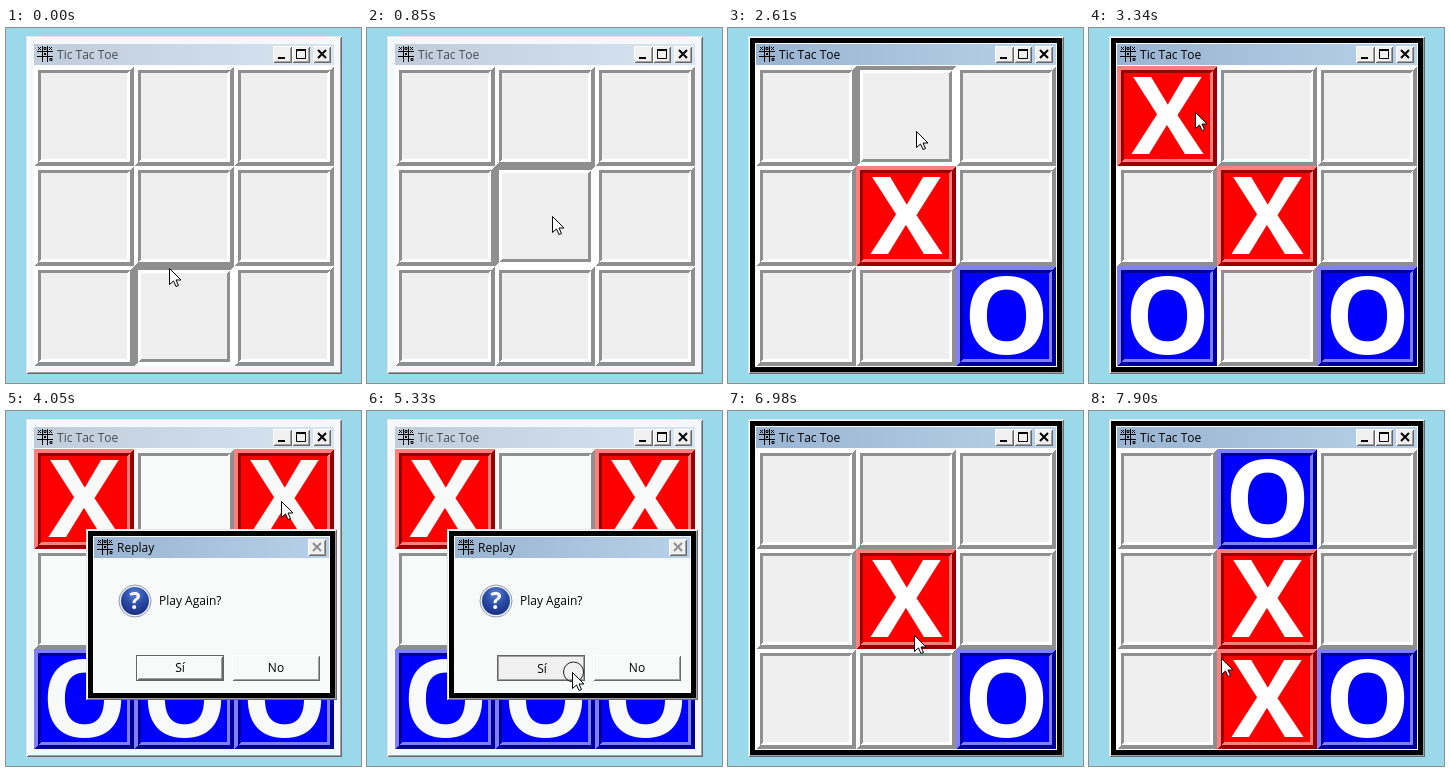
An HTML page for the animation above (8000 ms loop, 355 px wide and 355 px high).

```html
<!DOCTYPE html>
<html lang="en">
<head>
<meta charset="utf-8">
<title>Tic Tac Toe</title>
<style>
html, body { margin: 0; width: 100%; height: 100%; overflow: hidden; background: #9ad9ea }
svg { display: block; width: 100%; height: 100%; font: 12px "Open Sans", sans-serif; font-kerning: none }
.mark { font-size: 108px; font-weight: 700; text-anchor: middle }
.mid { text-anchor: middle }
.help { font-size: 23px; font-weight: 700; text-anchor: middle }
.crisp { shape-rendering: crispEdges }
</style>
</head>
<body>
<svg id="stage" viewBox="0 0 355 355"></svg>
<script>
const LOOP = 8000, STEP = 135;
const ACTIVATE = 1560, DIALOG_OPEN = 4050, DIALOG_PRESS = 5330, DIALOG_CLOSE = 5470;
const stage = document.getElementById('stage');

// The pointer glides to each point in even steps, optionally bending towards a control point
const glides = [
  { start: 0, end: 0, to: [163, 240] },
  { start: 280, end: 280, to: [163, 238] },
  { start: 580, end: 850, to: [185, 188] },
  { start: 2100, end: 2775, to: [77, 64], bend: [300, 120] },
  { start: 3340, end: 3340, to: [106, 84] },
  { start: 3475, end: 3610, to: [275, 90] },
  { start: 4450, end: DIALOG_PRESS, to: [205, 261], bend: [265, 165] },
  { start: 5880, end: 6280, to: [194, 207] },
  { start: 6860, end: 7295, to: [161, 276] },
  { start: 7900, end: 7900, to: [132, 247] }
];
const moves = [
  { press: ACTIVATE, release: 1820, x: 4, o: 8 },
  { press: 2775, release: 2910, x: 0, o: 6 },
  { press: 3890, release: DIALOG_OPEN, x: 2, o: 7 },
  { press: 6280, release: 6550, x: 4, o: 8 },
  { press: 7295, release: 7440, x: 7, o: 1 }
];

function pointerAt(t) {
  const i = glides.findLastIndex(g => g.start <= t);
  const { start, end, to, bend } = glides[i];
  const from = glides[Math.max(0, i - 1)].to;
  const steps = Math.round((end - start) / STEP) + 1;
  const p = t >= end ? 1 : (Math.floor((t - start) / STEP) + 1) / steps;
  return from.map((a, k) => {
    const c = bend ? bend[k] : (a + to[k]) / 2;
    return Math.round(a * (1 - p) ** 2 + 2 * c * p * (1 - p) + to[k] * p * p);
  });
}

const rect = (x, y, w, h, fill) => `<rect class="crisp" x="${x}" y="${y}" width="${w}" height="${h}" fill="${fill}"/>`;
const disc = (x, y, r, fill, stroke) => `<circle cx="${x}" cy="${y}" r="${r}" fill="${fill}" stroke="${stroke}"/>`;
const path = (d, stroke, width = 1, fill = 'none') =>
  `<path d="${d}" stroke="${stroke}" stroke-width="${width}" fill="${fill}"/>`;
const text = (x, y, s, fill = '#000', cls = '') => `<text x="${x}" y="${y}" fill="${fill}" class="${cls}">${s}</text>`;
const at = (x, y, content) => `<g transform="translate(${x} ${y})">${content}</g>`;

// Mitred border; the half pixel gives the diagonal to the top/left colour
const bevel = (x, y, w, h, b, topLeft, bottomRight) => rect(x, y, w, h, bottomRight) +
  `<path class="crisp" fill="${topLeft}" d="M${x} ${y}h${w + .5}l${-b} ${b}H${x + b}V${y + h - b + .5}l${-b} ${b}z"/>`;

const raised = (x, y, w, h, face = '#f0f0f0') =>
  bevel(x, y, w, h, 1, '#fff', '#696969') +
  bevel(x + 1, y + 1, w - 2, h - 2, 1, face, '#a0a0a0') +
  rect(x + 2, y + 2, w - 4, h - 4, face);

function cell(i, mark, state, white, face) {
  const x = 28 + i % 3 * 100, y = 38 + Math.floor(i / 3) * 100;
  let light = white, dark = '#8f8f8f';
  if (mark === 'X') [face, light, dark] = ['#f00', '#ff7f7f', '#900'];
  if (mark === 'O') [face, light, dark] = ['#00f', '#7f7fff', '#009'];
  const [a, b, c, d] = {
    ridge: [light, dark, dark, light],
    groove: [dark, light, light, dark],
    sunken: [dark, light, '#000', face]
  }[state];
  return bevel(x, y, 100, 100, 4, a, b) + bevel(x + 4, y + 4, 92, 92, 3, c, d) +
    rect(x + 7, y + 7, 86, 86, face) +
    (mark ? text(x + 50.5, y + 88, mark, white, 'mark') : '');
}

const cross = (x, y, s) => `M${x} ${y}l${s} ${s}m0 ${-s}l${-s} ${s}`;
const icon = (x, y) => at(x, y,
  path('M5.5 0v16M10.5 0v16M0 5.5h16M0 10.5h16', '#000') +
  path(cross(1, 1, 3) + cross(12, 1, 3) + cross(7, 7, 2) + 'M7 1.5h2v2h-2zM13 12.5h2v2h-2z', '#000'));

const closeButton = (x, y, ink) => raised(x, y, 18, 17) + path(cross(x + 5, y + 4, 8), ink, 2);

function frame(x, y, w, h, active, title) {
  return bevel(x, y, w, h, 1, '#e3e3e3', '#696969') +
    bevel(x + 1, y + 1, w - 2, h - 2, 1, '#fff', '#a0a0a0') +
    rect(x + 2, y + 2, w - 4, h - 4, active ? '#000' : '#f4f7fc') +
    rect(x + 7, y + 7, w - 14, h - 14, '#f8f9f9') +
    rect(x + 8, y + 8, w - 16, 21, `url(#${active ? 'active' : 'inactive'})`) +
    icon(x + 11, y + 10) + text(x + 31, y + 23, title, active ? '#000' : '#434e54');
}

function pushButton(x, label, isDefault, pressed) {
  const y = 244, w = 88, h = 26, shift = pressed ? 1 : 0;
  const body = pressed ? bevel(x + 1, y + 1, w - 2, h - 2, 1, '#a0a0a0', '#a0a0a0') + rect(x + 2, y + 2, w - 4, h - 4, '#f0f0f0')
    : isDefault ? raised(x + 1, y + 1, w - 2, h - 2, '#f8f9f9')
    : raised(x, y, w, h, '#f8f9f9');
  return (isDefault ? rect(x, y, w, h, '#646464') : '') + body +
    text(x + w / 2 + shift, y + 17 + shift, label, '#000', 'mid');
}

const dialog = pressed => frame(80, 118, 251, 171, true, 'Replay') + closeButton(302, 128, '#8f8f8f') +
  disc(129, 190, 16, '#f4f6fa', '#8f98ab') + disc(129, 190, 14, 'url(#ball)', 'none') +
  text(129, 198, '?', '#fff', 'help') + text(153, 194, 'Play Again?') +
  pushButton(130, 'Sí', true, pressed) + pushButton(226, 'No');

const defs = `<defs>
  <linearGradient id="active"><stop stop-color="#99b4d1"/><stop offset="1" stop-color="#b9d1ea"/></linearGradient>
  <linearGradient id="inactive"><stop stop-color="#bfcddb"/><stop offset="1" stop-color="#d7e4f2"/></linearGradient>
  <radialGradient id="ball" cy=".25" r=".75"><stop stop-color="#5d83cf"/><stop offset=".5" stop-color="#2a4da8"/><stop offset="1" stop-color="#1a2f80"/></radialGradient>
</defs>`;

function scene(t) {
  const [px, py] = pointerAt(t);
  const asking = t >= DIALOG_OPEN && t < DIALOG_CLOSE;
  const clicking = asking && t >= DIALOG_PRESS;
  const pressed = moves.some(m => t >= m.press && t < m.release);
  const marks = [];
  for (const { release, x, o } of moves) {
    if (t < release || (t >= DIALOG_CLOSE && release < DIALOG_CLOSE)) continue;
    marks[x] = 'X';
    marks[o] = 'O';
  }
  const hovered = asking ? -1 : Math.floor((px - 28) / 100) + 3 * Math.floor((py - 38) / 100);
  const [white, face] = asking ? ['#f8f9f9', '#f8f9f9'] : ['#fff', '#efefef'];

  let out = defs + rect(0, 0, 355, 355, '#9ad9ea') +
    frame(20, 8, 316, 338, t >= ACTIVATE && !asking, 'Tic Tac Toe') +
    raised(267, 18, 19, 17) + rect(272, 29, 7, 2, '#000') +
    raised(286, 18, 18, 17) + path('M290.5 22v8.5h9V22', '#000') + rect(290, 21, 10, 2, '#000') +
    closeButton(307, 18, '#000');
  for (let i = 0; i < 9; i++) {
    const state = i !== hovered || marks[i] ? 'ridge' : pressed ? 'sunken' : 'groove';
    out += cell(i, marks[i], state, white, face);
  }
  if (asking) out += dialog(clicking);
  if (clicking) out += disc(px + 1.5, py, 10, 'none', '#222');
  return out + at(px, py, path('M.5 .5v16l4-3.5 2.5 5.5 2.5-1-2.5-5.5h5z', '#000', 1, '#fff'));
}

let shown;
function tick() {
  const next = scene(performance.now() % LOOP);
  if (next !== shown) stage.innerHTML = shown = next;
  requestAnimationFrame(tick);
}
tick();
</script>
</body>
</html>
```
